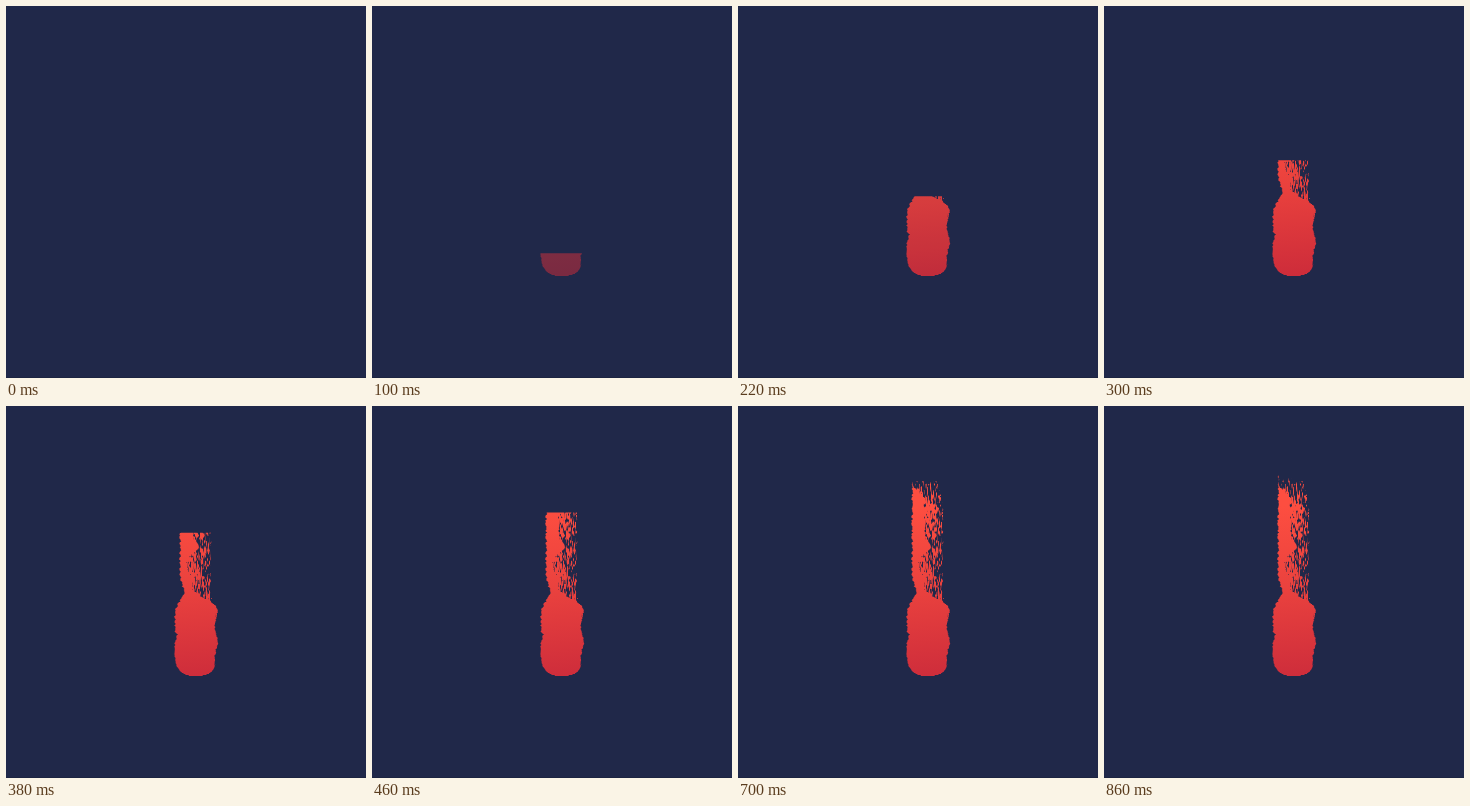
These frames come from a looping animation (360x372 px, 5.06 s). An HTML page with a canvas:

```html
<!DOCTYPE html>
<html lang="en">
<head>
<meta charset="utf-8">
<title>Brush stroke</title>
<style>
  html, body { margin: 0; height: 100%; overflow: hidden; background: #202849; }
  canvas { display: block; }
</style>
</head>
<body>
<canvas id="stage" width="360" height="372"></canvas>
<script>
const LOOP = 5060, STEP = 20, WIPE = 900, FADE = 330;
const TOP = 69, BOTTOM = 270;
const ctx = document.getElementById('stage').getContext('2d');

const clamp = v => Math.max(0, Math.min(1, v));
const mix = (a, b, k) => a + (b - a) * k;
const bump = (y, center, width) => Math.exp(-(((y - center) / width) ** 2));
function smooth(from, to, y) {
  const k = clamp((y - from) / (to - from));
  return k * k * (3 - 2 * k);
}

function hash(i, j) {
  let n = Math.imul(i, 374761393) ^ Math.imul(j, 668265263);
  n = Math.imul(n ^ (n >>> 13), 1274126177);
  return ((n ^ (n >>> 16)) >>> 0) / 4294967296;
}

// Noise in columns, smooth along y
function streak(col, y) {
  const j = Math.floor(y);
  return mix(hash(col, j), hash(col, j + 1), y - j);
}

// Outline of one row: narrow neck, waist, wavy body, rounded foot
function outline(y) {
  const foot = clamp((y - 250) / 20);
  const inset = 20 * (1 - (1 - foot ** 2.4) ** (1 / 2.4));
  const left = mix(174, 169, smooth(188, 207, y))
    + 3.5 * bump(y, 185, 10) + 1.8 * bump(y, 230, 4) + inset;
  const neck = mix(175, 187, smooth(78, 94, y))
    + 6 * bump(y, 141, 6) - 6 * bump(y, 159, 10);
  const body = 210 + 1.2 * Math.cos((y - 206) * Math.PI / 15) - inset;
  const solid = mix(neck, body, smooth(182, 202, y));
  const right = y > 196 ? solid : Math.max(solid, mix(199, 205, smooth(70, 105, y)));
  const density = .48 * smooth(66, 92, y) - .1 * bump(y, 141, 6);
  return { left, solid, right, density };
}

function paintStroke() {
  const layer = document.createElement('canvas');
  layer.width = 360;
  layer.height = 372;
  const g = layer.getContext('2d');
  const paint = g.createLinearGradient(178, 100, 195, 270);
  paint.addColorStop(0, '#fd4e40');
  paint.addColorStop(.5, '#e9413e');
  paint.addColorStop(1, '#ce2d3b');
  g.fillStyle = paint;
  for (let y = TOP; y < BOTTOM; y++) {
    const { left, solid, right, density } = outline(y + .5);
    const rough = seed => (streak(seed, y / 1.5) - .5) * (y > 250 ? .8 : 2);
    const l = left + rough(900), s = solid + rough(901), r = right + rough(902);
    for (let x = 166; x < 215; x++) {
      const along = clamp((x - s) / (r - s || 1));
      const noise = .65 * streak(x, y / 3) + .35 * streak(500 + (x >> 2), y / 6);
      const ink = density * (1.3 - .5 * along);
      const dry = clamp((ink - noise) * 4 + .5) * clamp(r - x);
      g.globalAlpha = Math.max(clamp((s - x) / 1.3), dry) * clamp((x + 1 - l) / 1.3);
      g.fillRect(x, y, 1, 1);
    }
  }
  return layer;
}

// cubic-bezier(.25, .1, .25, 1)
function ease(p) {
  if (p >= 1) return 1;
  const curve = (s, a, b) => 3 * a * s * (1 - s) ** 2 + 3 * b * s * s * (1 - s) + s ** 3;
  let lo = 0, hi = 1;
  for (let i = 0; i < 24; i++) {
    const mid = (lo + hi) / 2;
    if (curve(mid, .25, .25) < p) lo = mid; else hi = mid;
  }
  return curve(lo, .1, 1);
}

const stroke = paintStroke();
const start = performance.now();

function draw(now) {
  const t = Math.floor(Math.max(0, now - start) % LOOP / STEP) * STEP;
  ctx.fillStyle = '#202849';
  ctx.fillRect(0, 0, 360, 372);
  ctx.fillStyle = '#1c2441';
  ctx.fillRect(0, 371, 360, 1);
  if (t >= 40) {
    const edge = mix(BOTTOM, TOP, ease(t / WIPE));
    ctx.save();
    ctx.beginPath();
    ctx.rect(0, edge, 360, 372 - edge);
    ctx.clip();
    ctx.globalAlpha = ease(t / FADE);
    ctx.drawImage(stroke, 0, 0);
    ctx.restore();
  }
  requestAnimationFrame(draw);
}
draw(start);
</script>
</body>
</html>
```
